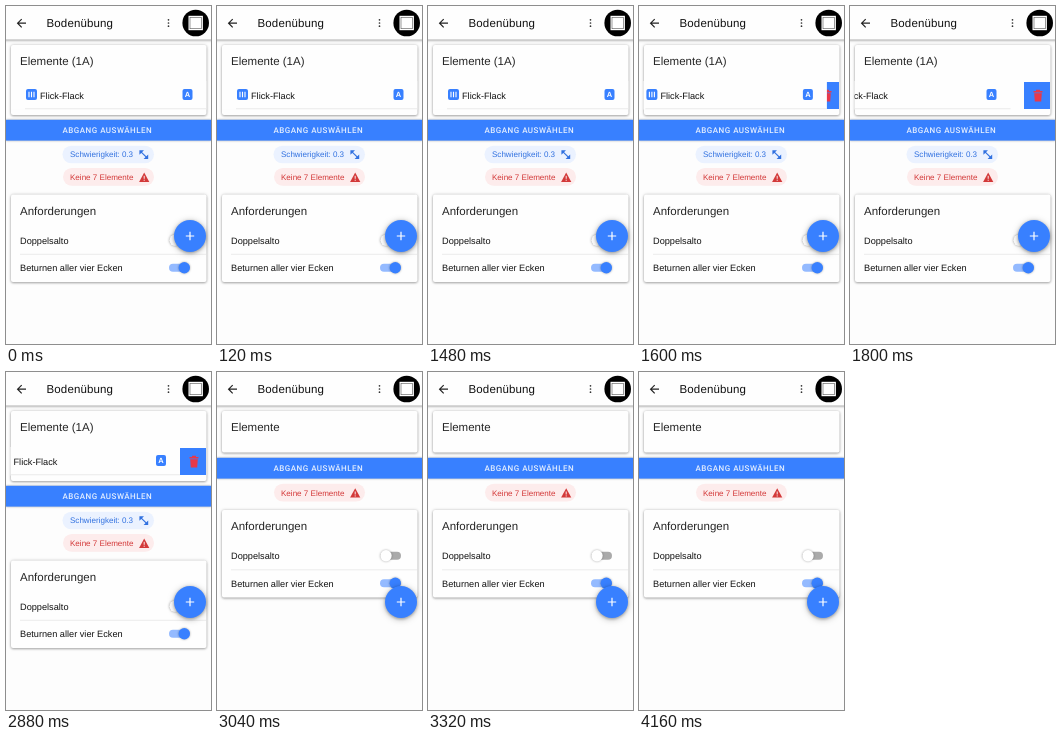
An HTML page that plays this animation: 205x338 px, repeating every 5.12 s.

```html
<!DOCTYPE html>
<html lang="de">
<head>
<meta charset="utf-8">
<style>
html, body { margin: 0; width: 100%; height: 100%; overflow: hidden; background: #fdfdfd; }
svg {
  display: block; width: 205px; height: 338px; fill: #111;
  font: 9.2px "Liberation Sans", Arial, sans-serif; text-rendering: geometricPrecision;
}
.title { font-size: 11.5px; fill: #262626; }
.chip { font-size: 8.05px; }
.action { font: 500 8px Roboto, sans-serif; letter-spacing: .48px; fill: #e6efff; }
.card { fill: #fefefe; filter: drop-shadow(0 1px 1px #0004) drop-shadow(0 0 1.5px #0003); }
.blue { fill: #3880ff; }
.line { stroke: #dedede; stroke-width: .6; }
.badge { font-size: 7.5px; font-weight: bold; fill: #fff; text-anchor: middle; }
.raised { filter: drop-shadow(0 1.5px 1.5px #0004) drop-shadow(0 1px 3px #0004); }
.knob { filter: drop-shadow(0 .7px .8px #0005); }
</style>
</head>
<body>
<svg viewBox="0 0 205 338">
  <clipPath id="row"><rect x="4.5" y="74" width="196" height="30"/></clipPath>

  <!-- toolbar -->
  <rect class="card" x="-5" y="-5" width="215" height="38.5"/>
  <path d="M20 17.2H11.8M15.7 13.1L11.6 17.2L15.7 21.3" fill="none" stroke="#222" stroke-width="1.2"/>
  <text x="40.5" y="21.4" font-size="11.5" letter-spacing=".14">Bodenübung</text>
  <g fill="#333">
    <circle cx="162.5" cy="13.8" r=".85"/><circle cx="162.5" cy="17" r=".85"/><circle cx="162.5" cy="20.2" r=".85"/>
  </g>
  <circle cx="189.7" cy="17" r="13.3" fill="#000"/>
  <rect x="182.5" y="9.8" width="14.4" height="14.4" fill="#fff"/>
  <rect x="184" y="11.3" width="11.4" height="11.4" fill="#fff" stroke="#555" stroke-width=".6"/>

  <!-- elements -->
  <rect id="list" class="card" x="5" y="39" width="195.5" height="70" rx="2"/>
  <text class="title" x="14" y="59">Elemente<tspan id="count"> (1A)</tspan></text>
  <g id="item" clip-path="url(#row)">
    <g id="trash">
      <rect class="blue" x="174" y="76" width="26" height="27"/>
      <path d="M183.5 85H192.5V86.4H183.5ZM186 83.7H190V85H186ZM184.2 87.2H191.8L191.2 95.5H184.8Z" fill="#e8384a"/>
    </g>
    <g id="slide">
      <rect x="5" y="75" width="195.5" height="28.5" fill="#fefefe"/>
      <path class="line" d="M19 102.7H200.5"/>
      <rect class="blue" x="20" y="83" width="11" height="11" rx="2"/>
      <path d="M23 85.7V91.3M25.5 85.7V91.3M28 85.7V91.3" stroke="#fff" stroke-width="1.1"/>
      <text x="34" y="92.5">Flick-Flack</text>
      <rect class="blue" x="176.5" y="83" width="10" height="11" rx="2"/>
      <text class="badge" x="181.5" y="91.2">A</text>
    </g>
  </g>

  <g id="button">
    <rect class="blue knob" y="113.8" width="205" height="20.8"/>
    <text class="action" x="56.5" y="127.1">ABGANG AUSWÄHLEN</text>
  </g>

  <g id="level">
    <rect x="56.5" y="139.7" width="91.5" height="17.6" rx="8.8" fill="#ebf2ff"/>
    <text class="chip" x="64" y="151.2" fill="#3171e0">Schwierigkeit: 0.3</text>
    <g fill="#3171e0" stroke="#3171e0">
      <path d="M133.4 144.2H138L133.4 148.8ZM142.2 153H137.6L142.2 148.4Z" stroke="none"/>
      <path d="M135 145.8L140.6 151.4" stroke-width="1.2"/>
    </g>
  </g>

  <g id="warning">
    <rect x="57" y="162" width="91" height="17.8" rx="8.9" fill="#fdecec"/>
    <text class="chip" x="64" y="174" fill="#d33939">Keine 7 Elemente</text>
    <path d="M138.2 166.5L143.3 175.9H133.1Z" fill="#d33939"/>
    <path d="M138.2 169.8V172.8M138.2 173.7V174.8" stroke="#fff" stroke-width=".9"/>
  </g>

  <g id="needs">
    <rect class="card" x="5" y="188.5" width="195.5" height="87.5" rx="2"/>
    <text class="title" x="14" y="208.5">Anforderungen</text>
    <text x="14" y="237.8">Doppelsalto</text>
    <path class="line" d="M14 248.3H200.5"/>
    <text x="14" y="265.3">Beturnen aller vier Ecken</text>
    <rect x="163.5" y="230.3" width="20.5" height="8" rx="4" fill="#aaa"/>
    <circle class="knob" cx="169" cy="234.3" r="5.7" fill="#fff"/>
    <rect x="163" y="257.8" width="20.5" height="8" rx="4" fill="#94baff"/>
    <circle class="knob blue" cx="178.3" cy="261.8" r="5.7"/>
  </g>

  <circle class="raised blue" cx="184" cy="230" r="16"/>
  <path d="M179.8 230H188.2M184 225.8V234.2" stroke="#fff" stroke-width="1.2"/>
</svg>
<script>
const LOOP = 5120, PULL = 40, OPEN = 26.5, REMOVED = 3040;
const $ = id => document.getElementById(id);
const clamp = v => Math.max(0, Math.min(1, v));
const move = (id, x, y) => $(id).setAttribute("transform", `translate(${x} ${y})`);
const show = (id, on) => $(id).style.display = on ? "" : "none";

// Drag beyond the open position, then spring back to it.
function slideAt(t) {
  const drag = clamp((t - 1485) / 310);
  const settle = 1 - (1 - clamp((t - 1805) / 450)) ** 5;
  return -PULL * drag * drag * (3 - 2 * drag) + (PULL - OPEN) * settle;
}

function draw(now) {
  const t = now % LOOP, full = t < REMOVED, x = slideAt(t);
  for (const id of ["count", "item", "level"]) show(id, full);
  show("trash", x < 0);
  move("slide", x, 0);
  $("list").setAttribute("height", full ? 70 : 41.5);
  move("button", 0, full ? 0 : -28);
  move("warning", 0, full ? 0 : -50.3);
  move("needs", 0, full ? 0 : -50.5);
  requestAnimationFrame(() => draw(performance.now()));
}
draw(performance.now());
</script>
</body>
</html>
```
